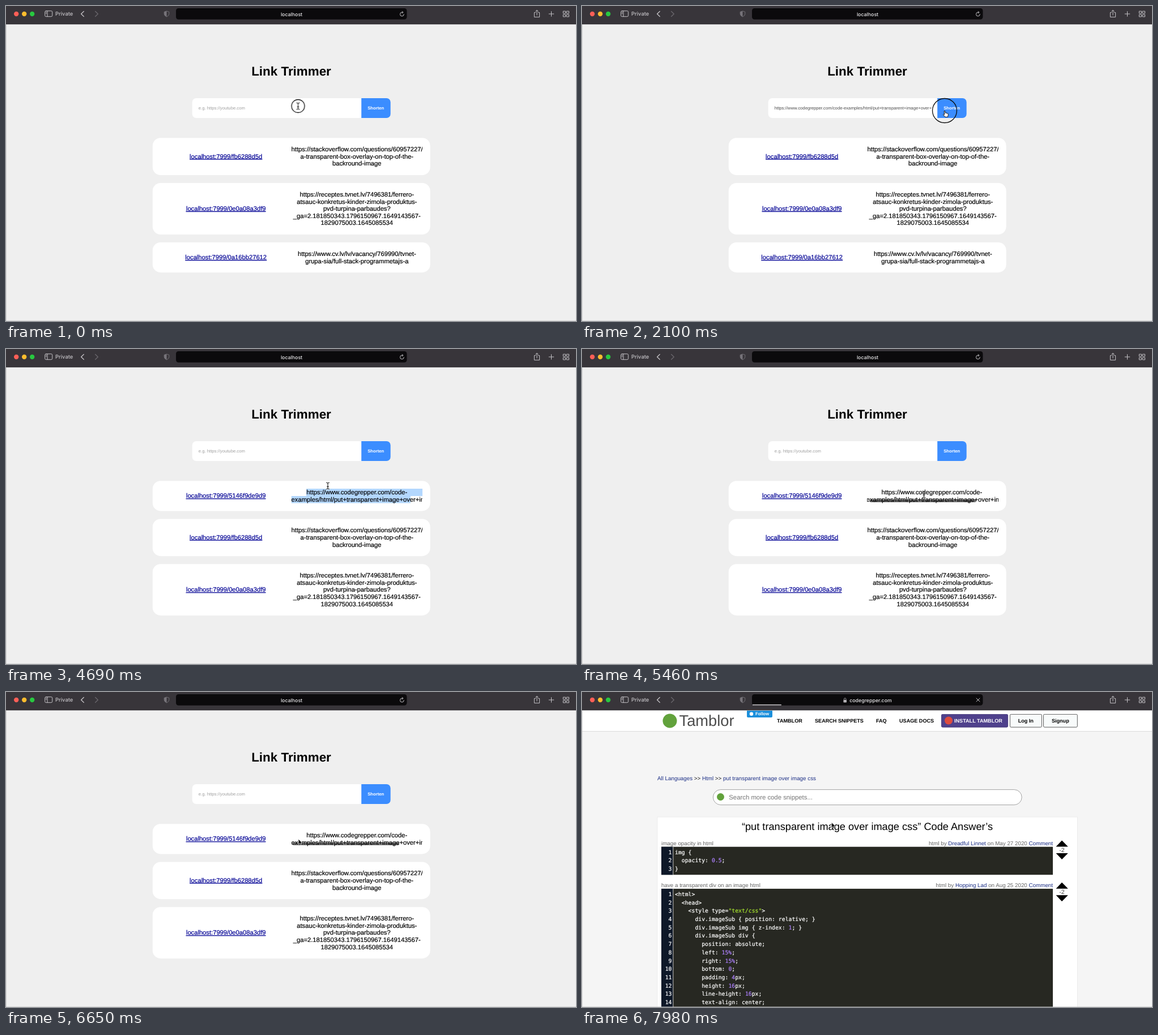
Write an HTML page that moves like this. It is 1006 px wide and 557 px high and loops after 8000 ms.

```html
<!DOCTYPE html>
<html lang="en">
<head>
<meta charset="utf-8">
<title>Link Trimmer</title>
<style>
html, body { margin: 0; width: 100%; height: 100%; overflow: hidden; background: #efefef; }
svg { display: block; width: 1006px; height: 557px; }
text { font-family: "Liberation Sans", Arial, sans-serif; text-rendering: geometricPrecision; }
.mid { text-anchor: middle; }
.end { text-anchor: end; }
.bold { font-weight: 700; }
.ui { font-family: Inter, sans-serif; font-weight: 500; fill: #e9e8ea; font-size: 8.8px; }
.line { fill: none; stroke: #c4c2c6; stroke-width: 1; stroke-linecap: round; stroke-linejoin: round; }
.body { font-size: 11.2px; }
.small { font-size: 7.7px; }
.row { stroke: #000; stroke-width: .2; }
.link { fill: #000094; stroke: #000094; stroke-width: .2; text-decoration: underline; }
.nav { font-size: 9.1px; font-weight: 700; }
.meta { font-size: 9.8px; fill: #666; }
.ref { fill: #1c2f86; }
.code { font-family: "DejaVu Sans Mono", monospace; font-size: 9.8px; fill: #fff; stroke: #fff; stroke-width: .22; }

/* one loop is 8 s, so 1% is 80 ms */
.cut { animation: 8s step-end infinite; }
.run { animation: 8s linear infinite; }

#listA { animation-name: listA; }
#listB { animation-name: listB; }
@keyframes listA { 0% { opacity: 1 } 35%, 100% { opacity: 0 } }
@keyframes listB { 0% { opacity: 0 } 35%, 100% { opacity: 1 } }

#hint { animation-name: hint; }
#tail { animation-name: tail; }
#head { animation-name: head; }
#caret { animation-name: caret; }
#caretEnd { animation-name: caretEnd; }
@keyframes hint { 0% { opacity: 1 } 14% { opacity: 0 } 35%, 100% { opacity: 1 } }
@keyframes tail { 0% { opacity: 0 } 14% { opacity: 1 } 25.75%, 100% { opacity: 0 } }
@keyframes head { 0% { opacity: 0 } 25.75% { opacity: 1 } 35%, 100% { opacity: 0 } }
@keyframes caret { 0% { opacity: 0 } 1.75% { opacity: 1 } 7%, 100% { opacity: 0 } }
@keyframes caretEnd { 0% { opacity: 0 } 14% { opacity: 1 } 20.125%, 100% { opacity: 0 } }

#reload { animation-name: reload; }
#stop { animation-name: stop; }
#bar { animation-name: bar; }
#host { animation-name: host; }
#dest { animation-name: dest; }
@keyframes reload { 0% { opacity: 1 } 28% { opacity: 0 } 42% { opacity: 1 } 91%, 100% { opacity: 0 } }
@keyframes stop { 0% { opacity: 0 } 28% { opacity: 1 } 42% { opacity: 0 } 91%, 100% { opacity: 1 } }
@keyframes bar {
  0%, 28% { width: 0 } 28.875% { width: 20px } 39.375% { width: 172px } 40.25% { width: 200px }
  41.125%, 41.99% { width: 406px } 42%, 91% { width: 0 }
  91.875% { width: 45px } 96.25% { width: 50px } 100% { width: 51px }
}
@keyframes host { 0% { opacity: 1 } 91%, 100% { opacity: 0 } }
@keyframes dest {
  0% { opacity: 0; transform: none } 91% { opacity: 1; transform: none }
  97.125%, 100% { opacity: 1; transform: translateX(5px) }
}

#sel1 { animation-name: sel1; }
#sel2 { animation-name: sel2; }
@keyframes sel1 {
  0% { x: 735px; width: 0 } 52.5% { x: 685px; width: 50px } 54.25% { x: 640px; width: 95px }
  55.125% { x: 530px; width: 205px } 59.5%, 100% { x: 735px; width: 0 }
}
@keyframes sel2 {
  0% { x: 714px; width: 0 } 51.625% { x: 690px; width: 24px }
  52.5% { x: 503.5px; width: 210.5px } 59.5%, 100% { x: 714px; width: 0 }
}

#slide { animation-name: slide; animation-timing-function: ease-in-out; }
#thumb { animation-name: thumb, thumbOn; animation-timing-function: ease-in-out, linear; }
#active { animation-name: active; }
@keyframes slide { 0%, 67.375% { transform: none } 73.5%, 75.25% { transform: translateX(-46px) } 81.25%, 100% { transform: none } }
@keyframes thumb { 0%, 67.375% { transform: translateX(-38px) } 73.5%, 75.25% { transform: none } 81.25%, 100% { transform: translateX(-38px) } }
@keyframes thumbOn { 0%, 67.37% { opacity: 0 } 67.375%, 83% { opacity: .55 } 86%, 100% { opacity: 0 } }
@keyframes active {
  0% { fill: #000094; stroke: #000094 } 85.75% { fill: #e00000; stroke: #e00000 }
  88.125%, 100% { fill: #000094; stroke: #000094 }
}

#pointer { animation-name: pointer; animation-timing-function: ease-in-out; }
@keyframes pointer {
  0%, 19.25% { transform: translate(515.5px, 177px) }
  25.375%, 29.75% { transform: translate(640px, 185px) }
  35.875%, 40.25% { transform: translate(627px, 219.5px) }
  42%, 43.75% { transform: translate(632px, 232px) }
  48.125%, 49.875% { transform: translate(713px, 264px) }
  53.375% { transform: translate(685px, 257px) }
  55.125%, 60.375% { transform: translate(568px, 242px) }
  63%, 80.5% { transform: translate(603.5px, 257px) }
  85.75%, 89.25% { transform: translate(430px, 263px) }
  93.625%, 100% { transform: translate(440.5px, 230.5px) }
}
#beam { animation-name: beam; }
#hand { animation-name: hand; }
#arrow { animation-name: arrow; }
@keyframes beam { 0% { opacity: 1 } 23.75% { opacity: 0 } 45.5% { opacity: 1 } 83%, 100% { opacity: 0 } }
@keyframes hand { 0% { opacity: 0 } 23.75% { opacity: 1 } 31.5% { opacity: 0 } 84% { opacity: 1 } 91%, 100% { opacity: 0 } }
@keyframes arrow { 0% { opacity: 0 } 31.5% { opacity: 1 } 45.5% { opacity: 0 } 83% { opacity: 1 } 84% { opacity: 0 } 91%, 100% { opacity: 1 } }

#ring { animation: ringSize 8s linear infinite, ringOn 8s step-end infinite; }
@keyframes ringSize {
  0%, .8% { r: 11.5px } 1.75% { r: 9px }
  25.75%, 26.6% { r: 21.5px } 28%, 28.9% { r: 11.5px }
  48.125%, 48.8% { r: 21.5px } 49.875%, 57.5% { r: 11.5px } 58.2% { r: 9px }
  85.75%, 86% { r: 21.5px } 87%, 100% { r: 11.5px }
}
@keyframes ringOn {
  0% { opacity: 1 } 1.75% { opacity: 0 } 25.75% { opacity: 1 } 28.875% { opacity: 0 }
  48.125% { opacity: 1 } 58.19% { opacity: 0 } 85.75% { opacity: 1 } 88.125%, 100% { opacity: 0 }
}

#site, #lock { animation-name: site; }
.late { animation-name: late; }
.token { animation-name: token; }
.string { animation-name: string; }
@keyframes site { 0% { opacity: 0 } 97.125%, 100% { opacity: 1 } }
@keyframes late { 0% { opacity: 0 } 98.875%, 100% { opacity: 1 } }
@keyframes token { 0% { fill: #fff; stroke: #fff } 98.875%, 100% { fill: #ae81ff; stroke: #ae81ff } }
@keyframes string { 0% { fill: #fff; stroke: #fff } 98.875%, 100% { fill: #a6e22e; stroke: #a6e22e } }
</style>
</head>
<body>
<svg viewBox="0 0 1006 557">
  <defs>
    <clipPath id="entryClip"><rect x="339" y="165" width="277.5" height="31"/></clipPath>
    <clipPath id="cellClip"><rect x="503.5" width="231.5" height="557"/></clipPath>
    <g id="votes">
      <path d="M836.5 273.5 847 262.5 857.8 273.5ZM836.5 285 847 296 857.8 285Z"/>
      <text class="mid" x="847" y="282.7" font-size="10.5" fill="#444">-2</text>
    </g>
    <path id="beamShape" d="M-2.4-5.8Q0-5.8 0-4.4 0-5.8 2.4-5.8M0-4.4V4.4M-2.4 5.8Q0 5.8 0 4.4 0 5.8 2.4 5.8M-1.3 1.4H1.3"/>
  </defs>

  <rect width="1006" height="557" fill="#efefef"/>

  <g id="app">
    <text class="mid bold" x="503.5" y="123" font-size="22.4">Link Trimmer</text>
    <rect x="328.7" y="163" width="350" height="35" rx="7" fill="#fff"/>
    <path d="M627.2 163H671.7a7 7 0 0 1 7 7V191a7 7 0 0 1-7 7H627.2Z" fill="#3b8dff"/>
    <text class="mid bold small" x="652.7" y="183.2" fill="#fff">Shorten</text>
    <g class="small" clip-path="url(#entryClip)">
      <text id="hint" class="cut" x="339.8" y="183.2" fill="#a0a0a0">e.g. https://youtube.com</text>
      <text id="tail" class="cut end" x="615" y="183.2" fill="#4c4c4c"></text>
      <text id="head" class="cut" x="339.8" y="183.2" fill="#4c4c4c"></text>
      <rect id="caret" class="cut" x="340" y="175" width=".8" height="11"/>
      <rect id="caretEnd" class="cut" x="615" y="175" width=".8" height="11"/>
    </g>
    <g id="listA" class="cut"></g>
    <g id="listB" class="cut"></g>
  </g>

  <g id="site" class="cut">
    <rect y="32" width="1006" height="525" fill="#f5f5f5"/>
    <rect y="32" width="1006" height="37.5" fill="#fff"/>
    <path d="M0 69.5H1006" stroke="#dcdcdc"/>
    <g class="cut late">
      <circle cx="155" cy="51" r="12.5" fill="#62a23c"/>
      <text x="171.5" y="60" font-size="27.3" fill="#4c4c4c">Tamblor</text>
      <path d="M291 33H336V43a2 2 0 0 1-2 2H293a2 2 0 0 1-2-2Z" fill="#1b8fdb"/>
      <circle cx="299" cy="38.7" r="3.2" fill="#fff"/>
      <text class="bold" x="306" y="41.3" font-size="7.6" fill="#fff">Follow</text>
    </g>
    <g class="nav">
      <text x="344" y="54">TAMBLOR</text>
      <text x="411" y="54">SEARCH SNIPPETS</text>
      <text x="519" y="54">FAQ</text>
      <text x="560" y="54">USAGE DOCS</text>
      <rect x="634.4" y="39.4" width="117.2" height="22.8" rx="2" fill="#4f418c" stroke="#3a2f70" stroke-width=".8"/>
      <circle cx="647" cy="50.5" r="7" fill="#dd4b3e"/>
      <text x="657" y="54" fill="#fff">INSTALL TAMBLOR</text>
      <g fill="#f8fbfb" stroke="#333" stroke-width=".8">
        <rect x="755.4" y="39.4" width="56" height="22.8" rx="2"/>
        <rect x="814.5" y="39.4" width="59.8" height="22.8" rx="2"/>
      </g>
      <text class="mid" x="783.3" y="54">Log In</text>
      <text class="mid" x="844.3" y="54">Signup</text>
    </g>
    <text class="meta" x="133" y="155.5" style="fill:#222"><tspan class="ref">All Languages</tspan> &gt;&gt; <tspan class="ref">Html</tspan> &gt;&gt; <tspan class="ref">put transparent image over image css</tspan></text>
    <rect x="231.4" y="172.6" width="544.8" height="27" rx="13.5" fill="#fff" stroke="#8c8c8c" stroke-width=".8"/>
    <circle cx="244.5" cy="185.5" r="6.5" fill="#62a23c"/>
    <text x="259.3" y="190" font-size="11.35" fill="#757575">Search more code snippets...</text>
    <rect x="133" y="221" width="741.5" height="340" fill="#fff" stroke="#e8e8e8" stroke-width=".8"/>
    <text class="mid" x="503.5" y="243.5" font-size="18.2">“put transparent image over image css” Code Answer’s</text>
    <text class="meta" x="140" y="271">image opacity in html</text>
    <text class="meta end" x="831" y="271">html by <tspan class="ref">Dreadful Linnet</tspan> on May 27 2020 <tspan class="ref">Comment</tspan></text>
    <text class="meta" x="140" y="345">have a transparent div on an image html</text>
    <text class="meta end" x="831" y="345">html by <tspan class="ref">Hopping Lad</tspan> on Aug 25 2020 <tspan class="ref">Comment</tspan></text>
    <g id="snippets"></g>
    <g class="cut late"><use href="#votes"/><use href="#votes" y="74.2"/></g>
  </g>

  <g id="toolbar">
    <rect width="1006" height="32" fill="#38353a"/>
    <rect y="31.4" width="1006" height="1" fill="#242226"/>
    <circle cx="18.2" cy="14" r="4.2" fill="#ff5f57"/>
    <circle cx="32.2" cy="14" r="4.2" fill="#febc2e"/>
    <circle cx="46.2" cy="14" r="4.2" fill="#28c840"/>
    <g class="line">
      <rect x="68.7" y="8.7" width="13" height="10" rx="2"/>
      <path d="M73 8.7V18.7M70.4 11.2H71.4M70.4 13.2H71.4"/>
      <path d="M137.3 9.5 132.6 14 137.3 18.5" stroke-width="1.3"/>
      <path d="M157.6 9.5 162.3 14 157.6 18.5" stroke="#6a676d" stroke-width="1.3"/>
      <path d="M934.5 11.5H932.4V19.6H941.6V11.5H939.5M937 16V7.5M934.7 9.6 937 7.3 939.3 9.6"/>
      <path d="M958.2 14H966.8M962.5 9.7V18.3"/>
      <path d="M983.7 9.2h3.8v3.8h-3.8zM989.7 9.2h3.8v3.8h-3.8zM983.7 15.2h3.8v3.8h-3.8zM989.7 15.2h3.8v3.8h-3.8z"/>
    </g>
    <path d="M283.5 9 287.8 10.4V14Q287.8 17.2 283.5 19 279.2 17.2 279.2 14V10.4Z" fill="none" stroke="#77747a" stroke-width=".9"/>
    <path d="M283.5 9V19Q279.2 17.2 279.2 14V10.4Z" fill="#77747a"/>
    <text class="ui" x="87" y="17.3" style="font-size:9.4px;fill:#c4c2c6">Private</text>
    <rect x="300" y="4" width="407.5" height="19.8" rx="4.5" fill="#0b0a0c"/>
    <text id="host" class="cut ui mid" x="504" y="17.6">localhost</text>
    <g id="dest" class="cut">
      <text class="ui mid" x="504.5" y="17.6">codegrepper.com</text>
      <g id="lock" class="cut">
        <rect x="456.4" y="14" width="5.6" height="4.6" rx=".8" fill="#b5b3b7"/>
        <path d="M457.5 14V12.5a1.7 1.7 0 0 1 3.4 0V14" fill="none" stroke="#b5b3b7" stroke-width=".9"/>
      </g>
    </g>
    <rect id="bar" class="run" x="301" y="21.9" width="0" height="1.6" rx=".6" fill="#cfcdd1"/>
    <path id="reload" class="cut line" d="M702.3 14.6A3.4 3.4 0 1 1 699 11.2H700.6M699.2 9.5 700.9 11.2 699.2 12.9"/>
    <path id="stop" class="cut line" d="M696 11 702 17M702 11 696 17"/>
  </g>
  <path d="M.35 33V556.65H1006" fill="none" stroke="#c6c6c6" stroke-width=".7"/>

  <g id="pointer" class="run">
    <circle id="ring" r="11.5" fill="none" stroke="#0c0c0c" stroke-width="1.3"/>
    <g id="beam" class="cut" fill="none" stroke-linecap="round">
      <use href="#beamShape" stroke="#fff" stroke-opacity=".7" stroke-width="2"/>
      <use href="#beamShape" stroke="#000"/>
    </g>
    <path id="hand" class="cut" d="M-.9.9Q0-.3.9.9L1.5 4.3Q2.6 3.6 3.2 4.6 4.4 4 4.8 5.2 6.2 4.8 6.3 6.2L6.2 8.4 5.4 11.2H.9L-2.3 7.6Q-2.7 6.2-1.3 6.3L-.2 7.2Z" fill="#fff" stroke="#000" stroke-width=".9" stroke-linejoin="round"/>
    <path id="arrow" class="cut" d="M0 0V9.6L2.2 7.6 3.8 11.2 5.4 10.5 3.9 7H6.8Z" stroke="#fff" stroke-width=".7" stroke-linejoin="round"/>
  </g>
</svg>

<script>
const $ = id => document.getElementById(id);
const escapeText = s => s.replace(/</g, '&lt;').replace(/>/g, '&gt;');

const longUrl = 'https://www.codegrepper.com/code-examples/html/put+transparent+image+over+image+css';
$('head').textContent = $('tail').textContent = longUrl;

const entries = {
  fresh: ['5146f9de9d9', 'https://www.codegrepper.com/code-', 'examples/html/put+transparent+image+over+image+css'],
  overlay: ['fb6288d5d', 'https://stackoverflow.com/questions/60957227/how-to-put-', 'a-transparent-box-overlay-on-top-of-the-', 'backround-image'],
  recipe: ['0e0a08a3df9', 'https://receptes.tvnet.lv/7496381/ferrero-', 'atsauc-konkretus-kinder-zimola-produktus-', 'pvd-turpina-parbaudes?', '_ga=2.181850343.1796150967.1649143567-', '1829075003.1645085534'],
  job: ['0a16bb27612', 'https://www.cv.lv/lv/vacancy/769990/tvnet-', 'grupa-sia/full-stack-programmetajs-a'],
};

function card(y, [hash, ...lines], isNew) {
  const height = lines.length * 12.6 + 28;
  const rows = lines.map((s, i) =>
    `<text class="row mid" x="619.3" y="${y + 23.9 + i * 12.6}">${s}</text>`).join('');
  const marks = isNew ? `
    <rect id="sel1" class="cut" y="247" width="0" height="13" fill="#b3d7fe"/>
    <rect id="sel2" class="cut" y="260" width="0" height="12.5" fill="#b3d7fe"/>` : '';
  const thumb = isNew ? '<rect id="thumb" class="run" x="544" y="266" width="188" height="5" rx="2.5"/>' : '';
  return `<rect x="258.8" y="${y}" width="489.8" height="${height}" rx="14" fill="#fff"/>
    <text ${isNew ? 'id="active"' : ''} class="cut body link mid" x="388.2" y="${y + height / 2 + 3.4}">localhost:7999/${hash}</text>
    <g class="body" clip-path="url(#cellClip)">${marks}<g ${isNew ? 'id="slide" class="run"' : ''}>${rows}</g>${thumb}</g>`;
}

function fillList(id, names) {
  let y = 233.2;
  $(id).innerHTML = names.map(name => {
    const html = card(y, entries[name], name === 'fresh');
    y += (entries[name].length - 1) * 12.6 + 42;
    return html;
  }).join('');
}
fillList('listA', ['overlay', 'recipe', 'job']);
fillList('listB', ['fresh', 'overlay', 'recipe']);

// lines wider than the cell start at its left edge
document.querySelectorAll('.row').forEach(row => {
  if (row.getComputedTextLength() < 231) return;
  row.classList.remove('mid');
  row.setAttribute('x', 503.6);
});

const paint = s => escapeText(s)
  .replace(/\d[\d.]*%?/g, '<tspan class="cut token">$&</tspan>')
  .replace(/"text\/css"/, '<tspan class="cut string">$&</tspan>');

function snippet(y, height, source) {
  const lines = source.split('\n').map((s, i) => {
    const base = y + 13 + i * 14.7;
    const indent = s.search(/\S/);
    return `<text class="code end" x="158.5" y="${base}">${i + 1}</text>
      <text class="code" x="${164 + indent * 5.9}" y="${base}">${paint(s.trim())}</text>`;
  }).join('');
  return `<rect x="140" y="${y}" width="691" height="${height}" fill="#272822"/>
    <rect x="140" y="${y}" width="20.5" height="${height}" fill="#0e1828"/>
    <rect x="160.4" y="${y}" width=".9" height="${height}" fill="#d8d8d8"/>${lines}`;
}

$('snippets').innerHTML = snippet(273.7, 49.5, `img {
  opacity: 0.5;
}`) + snippet(347.9, 210, `<html>
  <head>
    <style type="text/css">
      div.imageSub { position: relative; }
      div.imageSub img { z-index: 1; }
      div.imageSub div {
        position: absolute;
        left: 15%;
        right: 15%;
        bottom: 0;
        padding: 4px;
        height: 16px;
        line-height: 16px;
        text-align: center;`);
</script>
</body>
</html>
```
